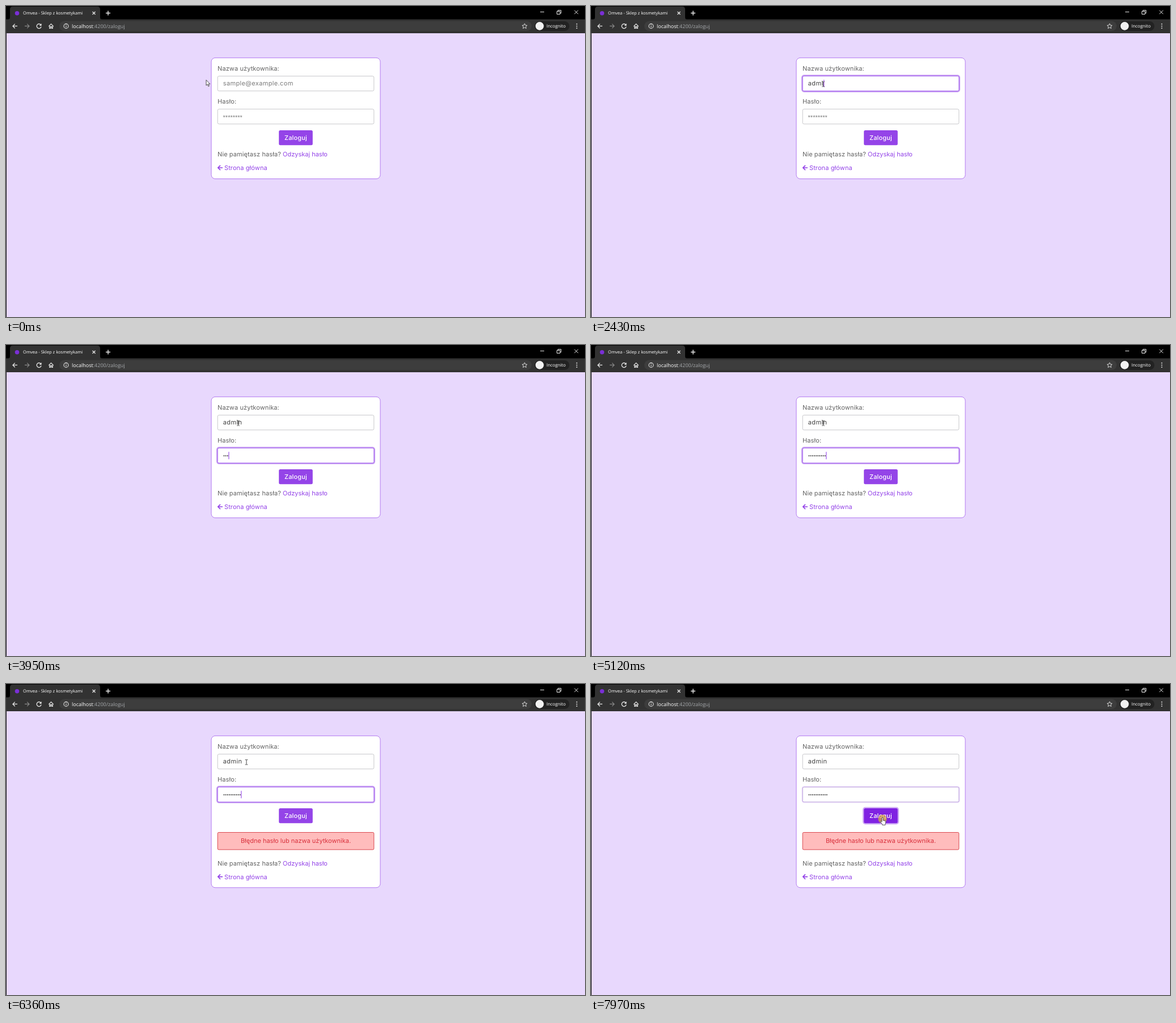
Animation of 1021 by 548 pixels, one loop 8 s. Source, as an HTML page:

```html
<!DOCTYPE html>
<html lang="pl">
<head>
<meta charset="utf-8">
<title>Logowanie</title>
<style>
  html, body { margin: 0; width: 100%; height: 100%; overflow: hidden; background: #e8d8fd; }
  svg { display: block; }
  text { font: 11px Inter, sans-serif; letter-spacing: .1px; fill: #636363; white-space: pre; text-rendering: geometricPrecision; }
  .ui text { font: 9px "Open Sans", sans-serif; letter-spacing: 0; fill: #fff; }
  .ui .title { font-size: 7.6px; }
  .ui .chip { font-size: 7.85px; }
  .ui .path { fill: #a5a8ab; }
  .line { fill: none; stroke: #e8e8e8; stroke-width: 1.1; }
  .typed { letter-spacing: .38px; fill: #454545; }
  .hint { letter-spacing: .35px; fill: #7b7b7b; }
  .stars { font: 11px "Liberation Sans", sans-serif; letter-spacing: 0; fill: #7b7b7b; }
  .link { fill: #9444e8; }
  .btn { font-weight: 500; fill: #fff; letter-spacing: .16px; }
  .error { fill: #d9303c; letter-spacing: 0; }
</style>
</head>
<body>
<svg width="1021" height="548" viewBox="0 0 1021 548">
  <rect width="1021" height="548" fill="#e8d8fd"/>
  <rect y="48" width="1" height="500" fill="#111"/>

  <g class="ui">
    <rect width="1021" height="24" fill="#000"/>
    <rect y="23.5" width="1021" height="24.5" fill="#323232"/>
    <path d="M3 24Q7 24 7 20V6Q7 1 12 1H161Q166 1 166 6V20Q166 24 170 24Z" fill="#323232"/>
    <circle cx="19.5" cy="12.7" r="3.8" fill="#7a2fd6"/>
    <text class="title" x="30" y="15.2">Omvea - Sklep z kosmetykami</text>
    <path class="line" d="M152.5 10l5 5m0-5l-5 5" style="stroke-width:1.3"/>
    <path class="line" d="M176 12.5h8m-4-4v8" style="stroke-width:1.5"/>
    <path class="line" d="M942 10.5h7M971.5 9.5h5.5v5h-5.5zM973.2 9.5v-2h5.6v5.2H977M1002.3 7.6l6.6 6.6m0-6.6l-6.6 6.6" style="stroke-width:1"/>

    <rect x="94" y="26.5" width="833" height="17.5" rx="8.75" fill="#3d3d3d"/>
    <path class="line" d="M20 35.4h-8m3.8-3.8l-3.8 3.8 3.8 3.8" style="stroke-width:1.3"/>
    <path class="line" d="M33 35.4h8m-3.8-3.8l3.8 3.8-3.8 3.8" style="stroke:#8a8a8a"/>
    <path class="line" d="M61.3 33a4 4 0 1 0 .8 3.4" style="stroke-width:1.3"/>
    <path d="M62.6 30.8v4h-4z" fill="#e8e8e8"/>
    <path class="line" d="M75.3 35.8l4.2-4.2 4.2 4.2M76.8 35v4.4h1.7v-3h2v3h1.7V35" style="stroke-width:1.2"/>
    <circle class="line" cx="106" cy="35.4" r="4"/>
    <path class="line" d="M106 34.7v2.8m0-4.7v1"/>
    <text x="116" y="38.6">localhost<tspan class="path">:4200/zaloguj</tspan></text>
    <path class="line" d="M914.5 30.9l1.3 3 3.2.3-2.4 2.1.7 3.2-2.8-1.7-2.8 1.7.7-3.2-2.4-2.1 3.2-.3z" style="stroke-width:.9"/>
    <rect x="932" y="27" width="61.5" height="17" rx="8.5" fill="#222"/>
    <circle cx="941" cy="35.4" r="7.3" fill="#f1f1f1"/>
    <text class="chip" x="953" y="38.3">Incognito</text>
    <g fill="#e8e8e8"><circle cx="1006.5" cy="31.8" r="1"/><circle cx="1006.5" cy="35.4" r="1"/><circle cx="1006.5" cy="39" r="1"/></g>
  </g>

  <rect id="card" x="362" y="91.3" width="298" height="213.2" rx="7" fill="#fff" stroke="#b279f0"/>
  <text x="373" y="113.7">Nazwa użytkownika:</text>
  <text x="373" y="172">Hasło:</text>

  <rect id="userRing" x="372.3" y="122.6" width="277.4" height="28" rx="3.5" fill="none" stroke="#9444e8"/>
  <rect id="userBox" x="373.2" y="123.5" width="275.6" height="26.2" rx="2.5" fill="#fff"/>
  <rect id="passRing" x="372.3" y="180.8" width="277.4" height="28" rx="3.5" fill="none" stroke="#9444e8"/>
  <rect id="passBox" x="373.2" y="181.7" width="275.6" height="26.2" rx="2.5" fill="#fff"/>
  <text id="userHint" class="hint" x="382.8" y="140.3">sample@example.com</text>
  <text id="user" class="typed" x="382.8" y="140.3"></text>
  <text id="passHint" class="stars" x="382.6" y="200">********</text>
  <g id="dots" fill="#222"></g>
  <rect id="caret" width="1.1" height="13" fill="#9444e8"/>

  <g id="idle">
    <rect id="btnRing" x="480.2" y="218" width="61.6" height="28.2" rx="3.5" fill="none" stroke="#9444e8"/>
    <rect id="btn" x="481.2" y="219" width="59.6" height="26.2" rx="2.5"/>
    <text class="btn" x="511" y="235.8" text-anchor="middle">Zaloguj</text>
  </g>
  <g id="busy">
    <rect x="463.8" y="219" width="94.4" height="26.2" rx="2.5" fill="#c197f3"/>
    <text class="btn" x="473.8" y="235.8">Logowanie</text>
    <g id="spinner" fill="#fff"></g>
  </g>

  <g id="error">
    <rect x="373.2" y="261.5" width="275.6" height="30.4" rx="2" fill="#ffbcbc" stroke="#d9474f"/>
    <text class="error" x="511" y="280.4" text-anchor="middle">Błędne hasło lub nazwa użytkownika.</text>
  </g>
  <g id="foot">
    <text x="373" y="265.2">Nie pamiętasz hasła?</text>
    <text class="link" x="488" y="265.2" style="letter-spacing:0">Odzyskaj hasło</text>
    <path d="M382 285h-8m4-4.2l-4.2 4.2 4.2 4.2" fill="none" stroke="#9444e8" stroke-width="1.7"/>
    <text class="link" x="385" y="289">Strona główna</text>
  </g>

  <circle id="press" r="7.6" fill="#e0b63c"/>
  <g id="cursor">
    <path id="arrow" d="M0 0V9.6L2.2 7.6 3.8 11.2 5.4 10.5 3.9 7H6.8Z" fill="#fff" stroke="#222" stroke-width=".8"/>
    <path id="beam" d="M-2.3-4.3H-.6L0-3.8 .6-4.3H2.3M0-3.8V3.8M-2.3 4.3H-.6L0 3.8 .6 4.3H2.3" fill="none" stroke="#444" stroke-width="1"/>
    <path id="hand" d="M-1 1Q-1-.6 .1-.6T1.2 1V5L4.4 5.6Q6 6 5.8 7.8L5 11V13H-.3V11.6L-3.7 7.6Q-4.2 6.2-2.6 6.3L-1 7.6Z" fill="#fff" stroke="#333" stroke-width=".8"/>
  </g>
</svg>
<script>
const LOOP = 8000, BLINK = 530, FADE = 300;
const CLICK = 880, TAB = 2810, SEND = 5590, FAIL = 6360, PRESS = 7870;
const PURPLE = [148, 68, 232];

const letters = [1810, 1950, 2260, 2430, 2580];
const userCarets = [383, 389.5, 396.5, 407.5, 410.2, 417.2];
const passKeys = [3660, 3810, 3950, 4180, 4350, 4500, 4580, 4810, 5040, 5120, 7340];
const passCaret = n => 383 + 3.13 * n;

// time, x, y, pointer shape
const path = [
  [0, 353, 130.4, 'arrow'], [330, 357, 131, 'arrow'], [410, 372, 133, 'arrow'],
  [490, 391, 136, 'beam'], [570, 404, 138, 'beam'], [650, 409.5, 137.7, 'beam'],
  [6200, 414, 136, 'beam'], [6280, 421, 134.5, 'beam'], [6360, 424, 137.7, 'beam'],
  [6430, 427, 146, 'beam'], [6510, 429, 160, 'beam'], [6580, 431, 176, 'beam'],
  [6660, 432.5, 190, 'beam'], [6740, 433.5, 200, 'beam'], [6880, 434, 205.5, 'beam'],
  [7650, 449, 209, 'arrow'], [7730, 479, 220, 'arrow'],
  [7810, 505, 232, 'hand'], [7890, 514, 235.5, 'hand']
];

const $ = id => document.getElementById(id);
const set = (id, attrs) => { for (const k in attrs) $(id).setAttribute(k, attrs[k]); };
const show = (id, on) => { $(id).style.display = on ? '' : 'none'; };
const count = (times, t) => times.filter(s => s <= t).length;
const ramp = (t, start, span = FADE) => {
  const p = Math.min(1, Math.max(0, (t - start) / span));
  return 1 - (1 - p) ** 2;
};
const mix = (a, b, k) => `rgb(${a.map((v, i) => Math.round(v + (b[i] - v) * k))})`;

function addDots(id, n, place, r) {
  for (let i = 0; i < n; i++) {
    const c = document.createElementNS('http://www.w3.org/2000/svg', 'circle');
    const [x, y] = place(i);
    c.setAttribute('cx', x);
    c.setAttribute('cy', y);
    c.setAttribute('r', r);
    $(id).append(c);
  }
}
addDots('dots', passKeys.length, i => [passCaret(i) + 1.5, 195.2], .95);
// ring of eight with the upper right one missing
addDots('spinner', 7, i => {
  const a = i * Math.PI / 4;
  return [4.5 * Math.cos(a), 4.5 * Math.sin(a)];
}, 1.05);

function focus(name, k) {
  set(name + 'Ring', { 'stroke-width': 2.6 * k, opacity: .55 * k });
  set(name + 'Box', { stroke: mix([200, 200, 204], [166, 104, 238], k) });
}

function drawCaret(t, typed, dots) {
  const inUser = t < TAB;
  const keys = inUser ? [CLICK, ...letters] : [TAB, ...passKeys];
  const last = Math.max(0, ...keys.filter(k => k <= t));
  const on = Math.floor((t - last) / BLINK) % 2 === 0;
  show('caret', on && t >= CLICK && t < PRESS);
  set('caret', inUser
    ? { x: userCarets[typed], y: 130 }
    : { x: passCaret(dots), y: 188.3 });
}

function drawPointer(t) {
  const [, x, y, shape] = path[count(path.map(p => p[0]), t) - 1];
  set('cursor', { transform: `translate(${x} ${y})` });
  for (const s of ['arrow', 'beam', 'hand']) show(s, s === shape);
  const first = t >= 800 && t < 1180;
  const glow = first ? .7 * (1 - ramp(t, 960, 220)) : t >= 7890 ? .7 : 0;
  set('press', { cx: x, cy: first ? y : y + 2.3, opacity: glow });
}

function draw(t) {
  const typed = count(letters, t), dots = count(passKeys, t);
  const busy = t >= SEND && t < FAIL, failed = t >= FAIL;

  focus('user', ramp(t, CLICK) * (1 - ramp(t, TAB)));
  focus('pass', ramp(t, TAB) * (1 - ramp(t, PRESS)));

  $('user').textContent = 'admin'.slice(0, typed);
  show('userHint', !typed);
  show('passHint', !dots);
  [...$('dots').children].forEach((c, i) => { c.style.display = i < dots ? '' : 'none'; });
  drawCaret(t, typed, dots);

  show('idle', !busy);
  show('busy', busy);
  set('spinner', { transform: `translate(543 232) rotate(${(t - SEND) * .18})` });
  set('btn', { fill: mix(PURPLE, [128, 34, 226], ramp(t, 7790, 150)) });
  const ring = ramp(t, PRESS, 150);
  set('btnRing', { 'stroke-width': 2.8 * ring, opacity: .5 * ring });

  show('error', failed);
  set('card', { height: failed ? 267.5 : 213.2 });
  set('foot', { transform: `translate(0 ${failed ? 54.6 : 0})` });
  drawPointer(t);
}

function tick() {
  draw(performance.now() % LOOP);
  requestAnimationFrame(tick);
}
tick();
</script>
</body>
</html>
```
